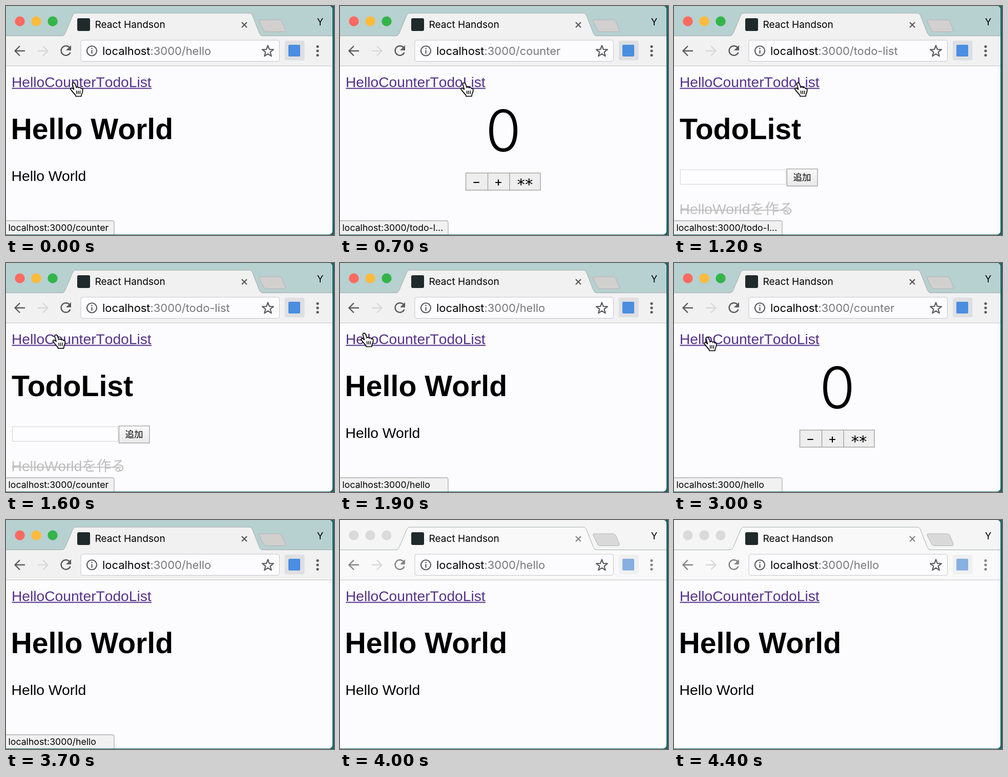
These frames come from a looping animation (640x449 px, 4500 ms). An HTML page:

```html
<!DOCTYPE html>
<html lang="ja">
<head>
<meta charset="utf-8">
<title>React Handson</title>
<style>
  html, body { margin: 0; width: 100%; height: 100%; overflow: hidden; background: #1f6468; }
  svg {
    display: block; width: 100vw; height: 100vh;
    --title: #b7d0d0; --bar: #f1f1f1; --icon: #5b5b5e;
    --red: #fc6a60; --amber: #fdbb3c; --green: #33b54a;
    --newtab: #d1d0cf; --ext: #dedfe2; --mark: #4b8de0;
  }
  svg.inactive {
    --title: #f5f5f5; --bar: #f9f9f9; --icon: #858588;
    --red: #dadada; --amber: #dadada; --green: #dadada;
    --newtab: #d9d9d9; --ext: #f0f0f0; --mark: #86b0e2;
  }
  .ui { font-family: Inter, "Noto Sans", sans-serif; }
  .page { font-family: "Liberation Sans", "Noto Sans CJK JP", "Noto Sans CJK", sans-serif; font-size: 28.3px; }
  .h1 { font-size: 57.2px; font-weight: bold; }
  .link { fill: #55318a; font-size: 28.2px; font-kerning: none; }
  .line { fill: none; stroke: var(--icon); stroke-width: 2.4; }
  .btn { fill: #eeeeee; stroke: #a6a6a6; stroke-width: 1.5; }
  .mid { text-anchor: middle; }
</style>
</head>
<body>
<svg id="stage" viewBox="0 0 640 449" preserveAspectRatio="none">
  <defs>
    <clipPath id="win"><rect x="-10" width="647" height="448" rx="7"/></clipPath>
    <linearGradient id="face" x2="0" y2="1">
      <stop stop-color="#fafafa"/><stop offset="1" stop-color="#e9e9e9"/>
    </linearGradient>
  </defs>

  <g clip-path="url(#win)">
    <rect width="640" height="449" fill="#fcfcff"/>
    <rect width="640" height="59" fill="var(--title)"/>
    <rect y="58.5" width="640" height="59" fill="var(--bar)"/>
    <path d="M0 58.5H640" stroke="#a5acac"/>
    <path d="M0 117.5H640" stroke="#c2c2c4"/>

    <g class="ui">
      <circle cx="27" cy="30" r="9.7" fill="var(--red)"/>
      <circle cx="59" cy="30" r="9.7" fill="var(--amber)"/>
      <circle cx="91" cy="30" r="9.7" fill="var(--green)"/>
      <path d="M108 60C114 58 115 55 117 50L130 19Q132 14 137 14H474Q479 14 481 19L493 50C495 55 496 58 502 60Z" fill="var(--bar)"/>
      <path d="M108 58.5C114 58 115 55 117 50L130 19Q132 14 137 14H474Q479 14 481 19L493 50C495 55 496 58 502 58.5" fill="none" stroke="#a5acac"/>
      <rect x="139" y="24" width="25" height="25" rx="3" fill="#20292b"/>
      <text x="173.5" y="43" font-size="19.1">React Handson</text>
      <path class="line" d="M460 32L470 42M470 32L460 42" stroke-width="2"/>
      <path d="M496 27H533Q537 27 538.5 31L545 47Q546 50.5 542 50.5H508Q504 50.5 502.5 47L494 30Q493 27 496 27Z" fill="var(--newtab)" stroke="#b0b2b2"/>
      <text class="mid" x="613" y="38" font-size="18.5">Y</text>

      <path class="line" d="M37 88H18M27 78.5L17.5 88L27 97.5"/>
      <path class="line" d="M62 88H81M72 78.5L81.5 88L72 97.5" style="stroke:#d8d8da"/>
      <path class="line" d="M124 81.5A9.3 9.3 0 1 0 125.5 91"/>
      <path d="M127 77V87H117Z" fill="var(--icon)"/>
      <rect x="146" y="67" width="387.5" height="41.5" rx="4" fill="#fcfcff" stroke="#c6c6ca"/>
      <g stroke="#5b5b5e" fill="none" stroke-width="2.2">
        <circle cx="167.5" cy="88" r="9.5"/>
        <path d="M167.5 86.5V93.5M167.5 82V84.5"/>
        <path id="star" stroke-linejoin="round"/>
      </g>
      <text x="188" y="96" font-size="21.9">localhost<tspan id="url" fill="#77777a"></tspan></text>
      <rect x="544" y="68" width="38.5" height="38.5" rx="3" fill="var(--ext)"/>
      <rect x="551" y="76" width="23" height="23" rx="2" fill="var(--mark)"/>
      <g fill="var(--icon)">
        <circle cx="608" cy="79.5" r="2.6"/><circle cx="608" cy="88" r="2.6"/><circle cx="608" cy="96.5" r="2.6"/>
      </g>
    </g>

    <g class="page">
      <text class="link" x="11" y="159">HelloCounterTodoList</text>
      <path d="M11.5 161.5H284" stroke="#55318a" stroke-width="1.8"/>

      <g id="hello">
        <text class="h1" x="9.5" y="261">Hello World</text>
        <text x="10.5" y="342.5">Hello World</text>
      </g>

      <g id="counter">
        <text class="ui mid" x="318.5" y="284.5" font-size="112" font-weight="350">0</text>
        <path class="btn" d="M245.5 327.5H391V361H245.5ZM288.5 327.5V361M331 327.5V361"/>
        <g class="ui mid" font-size="25">
          <text x="266" y="352.5">−</text>
          <text x="309" y="352.5">+</text>
          <text x="361" y="360" style="font:31px 'DejaVu Sans',sans-serif">**</text>
        </g>
      </g>

      <g id="todo">
        <text class="h1" x="11" y="261">TodoList</text>
        <rect x="12.5" y="321" width="206" height="28.5" fill="#fdfdff" stroke="#d2d2d2"/>
        <rect x="220.5" y="319.5" width="59.5" height="33.5" fill="url(#face)" stroke="#a0a0a0" stroke-width="1.3"/>
        <text class="mid" x="250" y="342" font-size="17.6">追加</text>
        <g fill="#bebebe">
          <text x="10.5" y="408">HelloWorldを作る</text>
          <rect x="12" y="399.5" width="213" height="1.8"/>
        </g>
      </g>
    </g>

    <g id="status" class="ui">
      <path d="M-2 421H207Q211 421 211 425V451H-2Z" fill="#f1f1f1" stroke="#b0b0b2" stroke-width="1.3"/>
      <text id="statusText" x="4.5" y="441" font-size="17.7"></text>
    </g>
  </g>

  <g id="hand" stroke="#000" stroke-width="1.7" stroke-linejoin="round" stroke-linecap="round">
    <path fill="#fff" d="M-2.5 2.5C-3-1 2-1.500 3 2L5.5 9C6 7 9.500 7.500 10 9.500C11 8 14 8.500 14.500 11C15.500 10 17.500 10.500 17.800 13C18.200 17 16.500 20 15.500 22L15 26H4L3.500 23.500C1 21-3 16-5.500 13C-7 10.500-4 9-2 10.500L.5 12.500Z"/>
    <path fill="none" stroke-width="1.5" d="M5.5 15.5L6 21M9 15.5V21M12.5 15.5L12.3 21"/>
  </g>
</svg>

<script>
  const $ = id => document.getElementById(id);
  const LOOP = 4500, STEP = 100;
  const BLUR = 4000, LEAVE = 3500;

  const pages = [[0, 'hello'], [300, 'counter'], [1000, 'todo'], [1800, 'hello'], [2400, 'counter'], [3300, 'hello']];
  const paths = { hello: '/hello', counter: '/counter', todo: '/todo-list' };
  const moves = [
    [0, 132, 151], [300, 132, 151], [600, 242, 151], [1400, 242, 151], [1700, 47, 138],
    [2000, 47, 138], [2300, 132, 151], [2700, 132, 151], [3000, 65, 146], [3200, 45, 145], [LOOP, 45, 145]
  ];

  const ease = p => p * p * (3 - 2 * p);

  function pointer(t) {
    const i = moves.findIndex(m => m[0] > t);
    const [t0, x0, y0] = moves[i - 1], [t1, x1, y1] = moves[i];
    const p = ease((t - t0) / (t1 - t0));
    return [x0 + (x1 - x0) * p, y0 + (y1 - y0) * p];
  }

  const hovered = x => x < 75 ? '/hello' : x < 174 ? '/counter' : '/todo-l...';
  const show = (id, on) => { $(id).style.display = on ? '' : 'none'; };

  function draw(t) {
    const page = pages.filter(p => p[0] <= t).pop()[1];
    const [x, y] = pointer(t);
    for (const id in paths) show(id, id === page);
    $('url').textContent = ':3000' + paths[page];
    $('statusText').textContent = 'localhost:3000' + hovered(x);
    $('hand').setAttribute('transform', `translate(${x} ${y})`);
    show('hand', t < LEAVE);
    show('status', t < BLUR);
    $('stage').classList.toggle('inactive', t >= BLUR);
  }

  const star = Array.from({ length: 10 }, (_, i) => {
    const a = i * Math.PI / 5, r = i % 2 ? 4.8 : 11.5;
    return `${511 + r * Math.sin(a)} ${89 - r * Math.cos(a)}`;
  });
  $('star').setAttribute('d', `M${star.join('L')}Z`);

  const start = performance.now();
  function tick() {
    const t = (performance.now() - start) % LOOP;
    draw(Math.floor(t / STEP) * STEP);
    requestAnimationFrame(tick);
  }
  tick();
</script>
</body>
</html>
```
